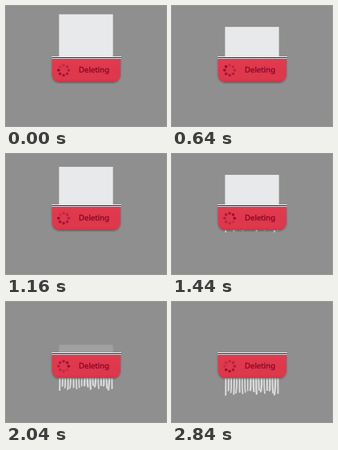
These frames come from a looping animation (200 px wide and 150 px high, 2880 ms). An HTML page:

```html
<!DOCTYPE html>
<html lang="en">
<head>
<meta charset="utf-8">
<title>Deleting</title>
<style>
  html, body { margin: 0; width: 100%; height: 100%; overflow: hidden; background: #8f8f8f; }
  svg { display: block; width: 100%; height: 100%; }
  text { font: 9.6px "Noto Sans", "Open Sans", sans-serif; fill: #8c0828; stroke: #8c0828; stroke-width: .35px; }
</style>
</head>
<body>
<svg viewBox="0 0 200 150">
  <defs>
    <linearGradient id="red" x2="0" y2="1">
      <stop offset="0" stop-color="#e13a4e"/>
      <stop offset=".85" stop-color="#dd384c"/>
      <stop offset="1" stop-color="#d33449"/>
    </linearGradient>
    <filter id="shadow" x="-10%" y="-20%" width="120%" height="150%">
      <feDropShadow dx="0" dy="1" stdDeviation="1" flood-color="#000" flood-opacity=".4"/>
    </filter>
    <clipPath id="above"><rect width="200" height="63"/></clipPath>
    <clipPath id="below"><rect y="90" width="200" height="60"/></clipPath>
  </defs>
  <g clip-path="url(#above)"><rect id="paper" x="66.3" width="67.4" height="70" fill="#e7e9eb"/></g>
  <g clip-path="url(#below)"><g id="strips" fill="#dadbdb"></g></g>
  <path d="M57.5 65H143V86a9 9 0 0 1-9 9H66.500a9 9 0 0 1-9-9Z" fill="url(#red)" filter="url(#shadow)"/>
  <rect x="57" y="63" width="87" height="1" fill="#f1eff3"/>
  <rect x="57" y="64" width="87" height="1" fill="#38232f"/>
  <rect x="57" y="65" width="87" height="1" fill="#e6d5de"/>
  <g id="spinner" fill="#920a2b"></g>
  <text x="91" y="83">Deleting</text>
</svg>
<script>
const LOOP = 2880, SPIN = LOOP / 5, DOTS = 8, STRIPS = 20;
const paper = document.getElementById('paper');
const strips = document.getElementById('strips');
const spinner = document.getElementById('spinner');

const linear = u => u;
const smooth = u => u * u * (3 - 2 * u);

// Keys are [time, value, easing towards this key].
function track(keys, t) {
  if (t <= keys[0][0]) return keys[0][1];
  for (let i = 1; i < keys.length; i++) {
    const [t0, v0] = keys[i - 1], [t1, v1, ease = linear] = keys[i];
    if (t < t1) return v0 + (v1 - v0) * ease((t - t0) / (t1 - t0));
  }
  return keys[keys.length - 1][1];
}

const paperTop = [[0, 10.4], [560, 27, smooth], [1060, 14.4, smooth], [1160, 16, u => u * u],
  [1440, 26], [1800, 42.5], [2040, 53.5], [2240, 63]];
const paperOpacity = [[1720, 1], [1800, .82], [2040, .2], [2120, 0]];
const stripEnd = [[1280, 94], [1440, 98], [1680, 103], [2040, 111], [2240, 115], [2440, 117, u => u * (2 - u)]];

function add(parent, tag, attributes) {
  const node = document.createElementNS('http://www.w3.org/2000/svg', tag);
  for (const key in attributes) node.setAttribute(key, attributes[key]);
  return parent.appendChild(node);
}

let seed = 11;
const random = () => (seed = seed * 16807 % 2147483647) / 2147483647;

// Strips hang from y = -30 to about 0 and slide down from behind the body.
for (let i = 0; i < STRIPS; i++) {
  const x = 66.3 + i * 3.43, end = -random() * 6;
  const lean = Math.max(66 - x, (random() - .5) * 2.6), width = 1.7 + random() * .7;
  add(strips, 'path', {
    d: `M${x} -30V-18Q${x} -8 ${x + lean} ${end}l${width} ${-random()}Q${x + width} -8 ${x + width} -18V-30Z`
  });
}

const dots = Array.from({ length: DOTS }, (_, i) => {
  const angle = i / DOTS * 2 * Math.PI;
  return add(spinner, 'circle', { cx: 72 + 6.3 * Math.sin(angle), cy: 80.3 - 6.3 * Math.cos(angle), r: 1.8 });
});

function draw(now) {
  const t = now % LOOP;
  paper.setAttribute('y', track(paperTop, t));
  paper.setAttribute('opacity', track(paperOpacity, t));
  strips.setAttribute('transform', `translate(0 ${track(stripEnd, t)})`);
  const head = t / SPIN + .8;
  dots.forEach((dot, i) => {
    const age = (head - i / DOTS + 1) % 1;
    dot.setAttribute('opacity', 1 - .8 * age);
  });
}

const start = performance.now();
function frame() {
  draw(performance.now() - start);
  requestAnimationFrame(frame);
}
frame();
</script>
</body>
</html>
```
